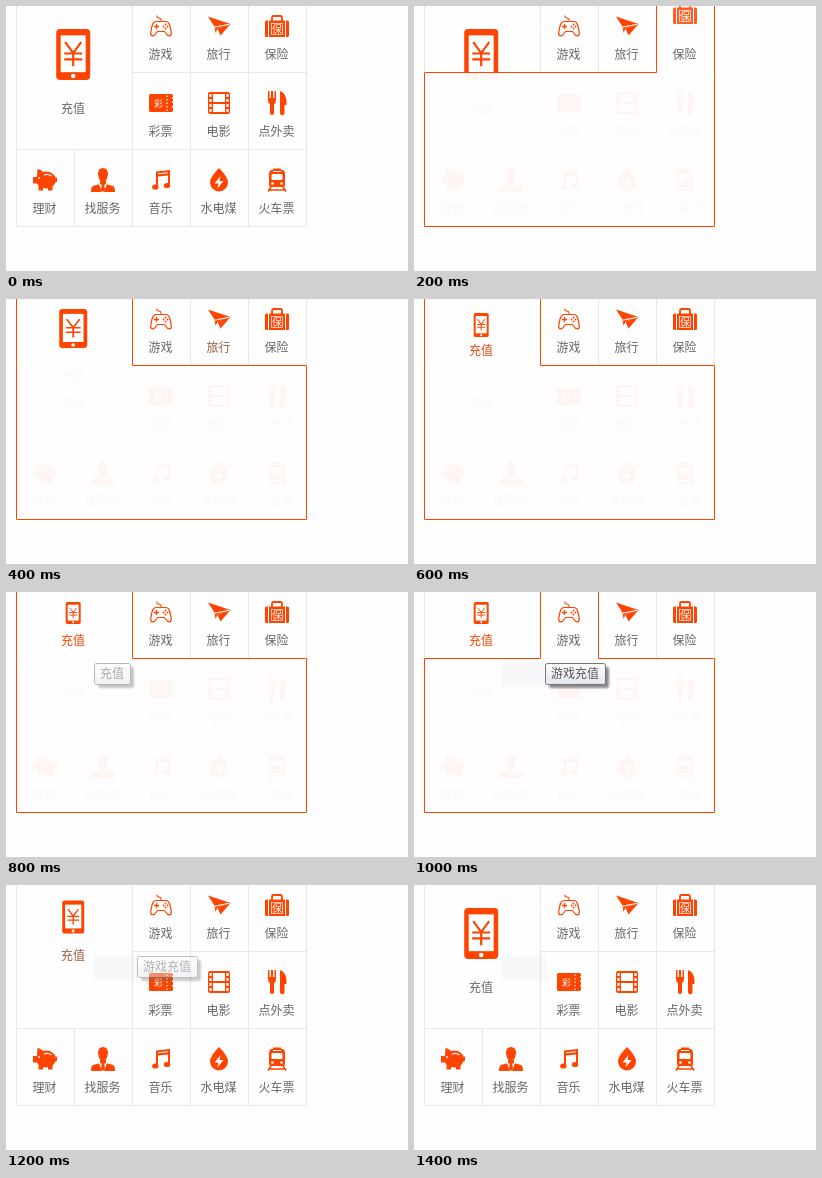
These frames come from a looping animation (402x265 px, 1800 ms). An HTML page:

```html
<!DOCTYPE html>
<html lang="zh-CN">
<head>
<meta charset="utf-8">
<style>
html, body { margin: 0; width: 100%; height: 100%; overflow: hidden; background: #fefefe; }
svg { display: block; width: 100%; height: 100%; }
text { font: 12px "Noto Sans CJK SC", "Noto Sans CJK", sans-serif; text-anchor: middle; fill: #666; }
.line { fill: none; stroke: #e8e8e8; }
.ico { fill: #ff4400; }
.o { fill: none; stroke: #ff4400; }
.w { fill: #fff; }
.ws { fill: none; stroke: #fff; }
</style>
</head>
<body>
<svg viewBox="0 0 402 265" xmlns="http://www.w3.org/2000/svg">
  <defs>
    <linearGradient id="sheen" x2="0" y2="1">
      <stop offset="0" stop-color="#fff"/><stop offset="1" stop-color="#e4e5f0"/>
    </linearGradient>
    <filter id="soft"><feGaussianBlur stdDeviation=".8"/></filter>

    <!-- Icons are drawn around their own centre -->
    <g id="game">
      <path class="o" stroke-width="1.2" stroke-linejoin="round" d="M-5 -4.500C-9 -4.500 -9.500 2 -10.300 7C-10.500 10.500 -7 11 -5 7.500L-3.500 5.500H3.500L5 7.500C7 11 10.500 10.500 10.300 7C9.500 2 9 -4.500 5 -4.500Z"/>
      <path class="o" stroke-width="1.1" d="M0 -4.500V-6.500C0 -9 -5 -7 -4 -10.500"/>
      <path class="o" stroke-width="1.3" d="M-7 .5H-2M-4.500 -2V3"/>
      <circle cx="4.500" cy="-1.500" r=".9"/><circle cx="4.500" cy="2.500" r=".9"/>
      <circle cx="2.500" cy=".5" r=".9"/><circle cx="6.500" cy=".5" r=".9"/>
    </g>
    <g id="travel">
      <path d="M-11 -9.500L11.500 -2L-4.500 .5Z"/>
      <path d="M11.500 -2L1.500 9.500L-1.500 2.800Z"/>
      <path d="M-4.500 .5L-3.500 7L-1.500 2.800L11.500 -2Z"/>
      <path class="ws" stroke-width="1" d="M10 -1.700L-4 1.200"/>
    </g>
    <g id="bag">
      <path class="o" stroke-width="1.800" d="M-5 -5V-8.500Q-5 -10 -3.500 -10H3.500Q5 -10 5 -8.500V-5"/>
      <rect x="-12" y="-5.500" width="24" height="16.500" rx="1.500"/>
      <path class="ws" stroke-width="1" d="M-8.500 -6V11M8.500 -6V11"/>
      <rect class="ws" x="-5.500" y="-2.500" width="11" height="11" stroke-width=".7"/>
      <text class="w" y="6.800" style="font-size:10px">保</text>
    </g>
    <g id="ticket">
      <rect x="-12" y="-9" width="24" height="18" rx="1.500"/>
      <path class="ws" stroke-width="1.200" stroke-dasharray="1.500 2" d="M6 -7.500V8"/>
      <path class="ws" stroke-width="1.200" stroke-dasharray="1.500 3" d="M11.700 -6V7"/>
      <text class="w" x="-2.500" y="3.500" style="font-size:9px">彩</text>
    </g>
    <g id="film">
      <rect x="-11" y="-11" width="22" height="22" rx="2"/>
      <path class="w" d="M-6 -9H6V-1H-6ZM-6 1H6V9H-6Z"/>
      <path class="ws" stroke-width="2.200" stroke-dasharray="3 2" d="M-8.500 -9V9M8.500 -9V9"/>
    </g>
    <g id="food">
      <path d="M-9 -12H-7.500V-5H-6V-12H-4V-5H-2.500V-12H-1V-3Q-1 0 -3 1V10A2 2 0 0 1 -7 10V1Q-9 0 -9 -3Z"/>
      <path d="M3 -12Q9.500 -10 9.500 0V2H7.500V10A2 2 0 0 1 3 10Z"/>
    </g>
    <g id="pig">
      <ellipse cx="1" cy="0" rx="10" ry="8.500"/>
      <path d="M-8 -4L-7.500 -11Q-3.500 -10.500 -1.500 -7ZM-7 -3H-12V3.500H-7ZM-6.500 5H-2V10.500H-6.500ZM3 5H7.500V10.500H3ZM10 -1L12 -3V2H10Z"/>
      <circle class="w" cx="-6" cy="-2" r=".9"/>
      <path class="ws" stroke-width="1.300" d="M-1 -5Q3 -6.500 6.500 -4"/>
    </g>
    <g id="person">
      <path d="M-5 -6Q-5 -12 0 -12Q5 -12 5 -6Q4 2 0 2Q-4 2 -5 -6Z"/>
      <path d="M-3 1H3V4L10 6Q12 7 12 12H-12Q-12 7 -10 6L-3 4Z"/>
      <path class="w" d="M-4.500 3L-1 12H1L4.500 3L1 5H-1Z"/>
      <path d="M-1.200 4.500H1.200L2 10L0 12L-2 10Z"/>
    </g>
    <g id="music">
      <path d="M-5 -8.500L9 -10V5.500H7V-4.500L-3 -3.500V7H-5Z"/>
      <path class="ws" d="M-3 -6.300L7 -7.200"/>
      <ellipse cx="-5.700" cy="7" rx="3.200" ry="2.600"/><ellipse cx="6" cy="5.500" rx="3.200" ry="2.600"/>
    </g>
    <g id="drop">
      <path d="M0 -12Q9 -3 9 2.500A9 9 0 0 1 -9 2.500Q-9 -3 0 -12Z"/>
      <path class="w" d="M1.500 -4L-4.500 3.500H-.5L-1.500 8.500L4.500 1H.5Z"/>
    </g>
    <g id="train">
      <path d="M-4 -11.500H4V-10H6Q8 -9 8 -6V5Q8 7 6 7H-6Q-8 7 -8 5V-6Q-8 -9 -6 -10H-4Z"/>
      <path class="ws" d="M-4 -8.500H4"/>
      <rect class="w" x="-5.500" y="-6" width="11" height="6" rx="1"/>
      <circle class="w" cx="-4.500" cy="3.500" r="1.300"/><circle class="w" cx="4.500" cy="3.500" r="1.300"/>
      <path class="o" stroke-width="1.600" d="M-6 7L-9 11.500M6 7L9 11.500M-8 10H8"/>
    </g>
  </defs>

  <rect width="402" height="265" fill="#fefefe"/>
  <path class="line" d="M10.500 0V220.500H300.500V0M126.500 0V220M184.500 0V220M242.500 0V220M68.500 143V220M126 66.500H300M10 143.500H300"/>
  <g id="cells"></g>
  <text id="restLabel" x="67" y="106.500">充值</text>

  <g id="phone" class="ico">
    <rect x="-17" y="-26" width="34" height="52" rx="4"/>
    <rect class="w" x="-12.500" y="-19.500" width="25" height="37.500"/>
    <circle class="w" cy="22" r="2.300"/>
    <path class="o" stroke-width="2.200" d="M-8 -12.500L0 -1.500L8 -12.500M0 -1.500V12M-9 -1H9M-9 5H9"/>
  </g>
  <text id="phoneLabel" x="67">充值</text>

  <g id="panel">
    <rect x="10" y="66" width="291" height="155" fill="#fffdfd" opacity=".96"/>
    <path id="outline" fill="none" stroke="#ff4400"/>
  </g>

  <rect id="trace" x="88" y="70" width="44" height="25" fill="#f9f9fc" style="mix-blend-mode:multiply"/>
  <g id="tip">
    <rect id="tipShade" x="4" y="4" height="21" rx="2" fill="#666" opacity=".75" filter="url(#soft)"/>
    <rect id="tipBox" x=".5" y=".5" height="21" rx="2" fill="url(#sheen)" stroke="#767676"/>
    <text id="tipText" y="15.200" style="fill:#575757"></text>
  </g>
</svg>
<script>
const LOOP = 1800, STEP = 100;
const $ = id => document.getElementById(id);
const set = (el, attrs) => { for (const k in attrs) el.setAttribute(k, attrs[k]); };
const show = (el, on) => { el.style.display = on ? '' : 'none'; };

const cells = [
  ['game', '游戏', 155, 20], ['travel', '旅行', 213, 20], ['bag', '保险', 271, 20],
  ['ticket', '彩票', 155, 97], ['film', '电影', 213, 97], ['food', '点外卖', 271, 97],
  ['pig', '理财', 39, 174], ['person', '找服务', 97, 174], ['music', '音乐', 155, 174],
  ['drop', '水电煤', 213, 174], ['train', '火车票', 271, 174]
];
$('cells').innerHTML = cells.map(([id, label, x, y]) =>
  `<g class="ico" id="${id}Icon"><use href="#${id}" x="${x}" y="${y}"/></g>` +
  `<text id="${id}Label" x="${x - .5}" y="${y + 32.5}">${label}</text>`).join('');

// Phone pose: width, height, centre y, label centre y, label heat
const REST = [34, 51, 48.5, 102, 0], SMALL = [15, 22, 21, 48, 1];
const poses = {
  3: [32, 48, 41, 90, 0], 4: [28, 39, 29.5, 76, .3], 5: [21, 31, 27, 62, .6],
  6: [15, 24, 26, 51, .85], 7: SMALL, 8: SMALL, 9: SMALL, 10: SMALL,
  11: [17, 26, 25, 56, .8], 12: [22, 33, 32, 70, .4], 13: [29, 44, 42, 89, .15]
};
const edges = [10.5, 126.5, 184.5, 242.5, 300.5];

function activeTab(step) {
  if (step < 2 || step > 10) return -1;
  return step === 2 ? 3 : step === 3 ? 2 : step === 10 ? 1 : 0;
}

function heat(k) {
  const mix = (a, b) => Math.round(a + (b - a) * k);
  return `rgb(${mix(102, 255)},${mix(102, 68)},${mix(102, 0)})`;
}

function drawTip(step) {
  const first = step < 10;
  const alpha = { 8: .5, 9: 1, 10: 1, 11: .85, 12: .45 }[step] || 0;
  const label = first ? '充值' : '游戏充值';
  const width = label.length * 12 + 12;
  set($('tip'), { transform: `translate(${first ? 88 : 131} 71)`, opacity: alpha });
  set($('tipBox'), { width });
  set($('tipShade'), { width });
  set($('tipText'), { x: width / 2 });
  $('tipText').textContent = label;
}

function draw(time) {
  const step = Math.floor((time % LOOP) / STEP);
  const [w, h, cy, ty, warm] = poses[step] || REST;
  set($('phone'), { transform: `translate(67.2 ${cy}) scale(${w / 34} ${h / 52})` });
  set($('phoneLabel'), { y: ty + 4.5 });
  $('phoneLabel').style.fill = heat(warm);

  const tab = activeTab(step), open = tab >= 0;
  show($('panel'), open);
  show($('restLabel'), open);
  if (open) {
    set($('outline'), { d: `M${edges[tab]} -1V66.5H10.5V220.5H300.5V66.5H${edges[tab + 1]}V-1` });
  }

  set($('bagIcon'), { transform: `translate(0 ${step === 2 ? -13 : 0})`, opacity: step === 2 ? .85 : 1 });
  set($('travelIcon'), { transform: `translate(0 ${step === 3 ? -8 : 0})` });
  $('travelLabel').style.fill = heat({ 3: .6, 4: .35 }[step] || 0);

  show($('trace'), step >= 10);
  drawTip(step);
}

const start = performance.now();
function tick() {
  draw(performance.now() - start);
  requestAnimationFrame(tick);
}
tick();
</script>
</body>
</html>
```
